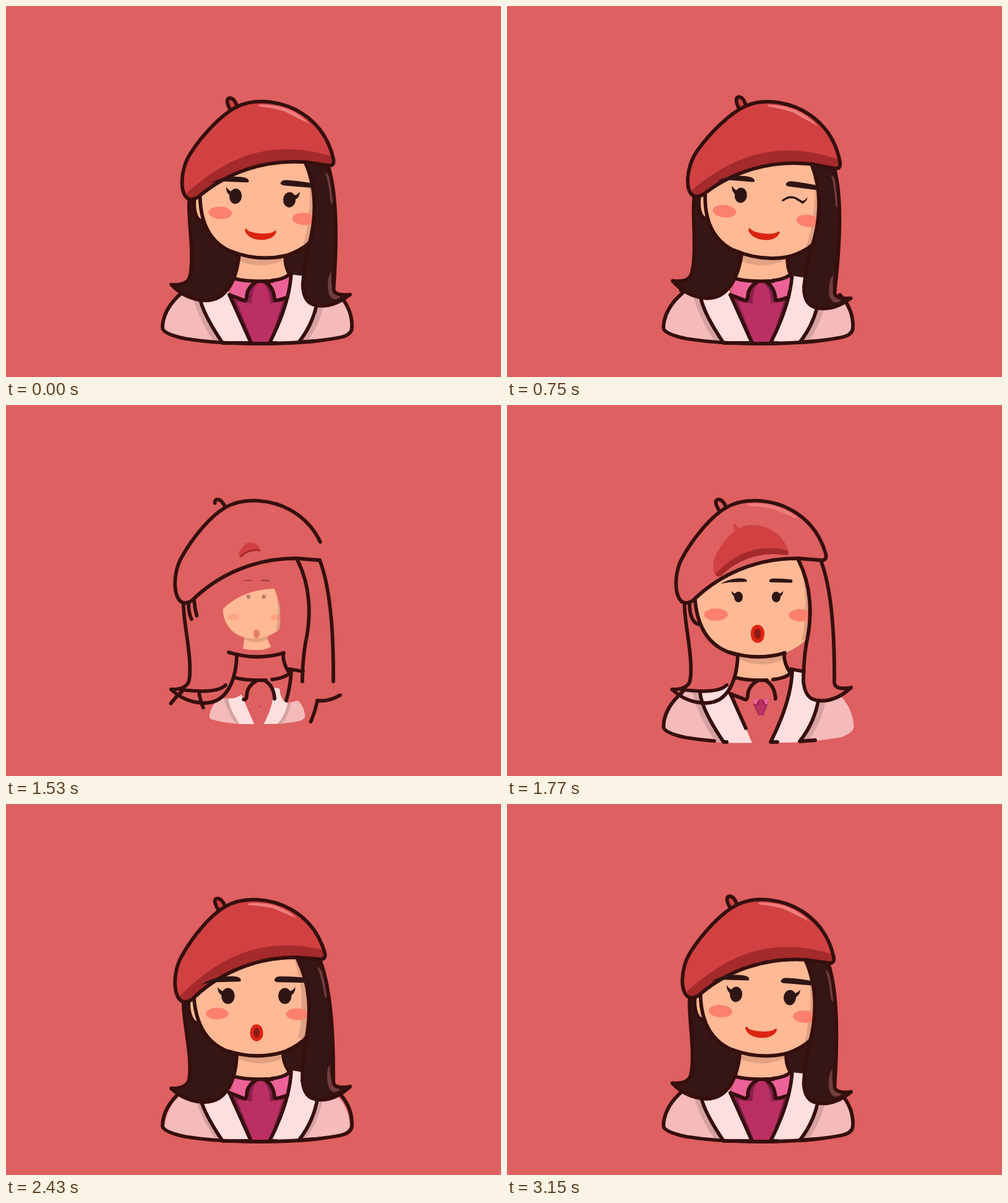
Animation of 800x600 px, one loop 3.18 s. Source, as an HTML page:

```html
<!DOCTYPE html>
<html lang="en">
<head>
<meta charset="utf-8">
<title>Girl in a beret</title>
<style>
html, body { margin: 0; height: 100%; overflow: hidden; background: #de6060; }
svg { display: block; width: 800px; height: 600px; }
.line path { fill: none; stroke: #350f0d; stroke-width: 5.8; stroke-linecap: round; stroke-linejoin: round; }
</style>
</head>
<body>
<svg viewBox="0 0 800 600">
  <defs>
    <path id="hatShape" d="M507 251Q495 250 470 248C400 248 345 275 306 311Q297 321 288 320C270 318 268 273 284 246C301 215 330 180 354 166C385 148 430 153 460 170C490 187 507 213 515 240Q518 252 507 251Z"/>
    <path id="faceShape" d="M304 314C342 275 400 248 470 248Q490 290 489 340Q488 365 486 377C468 396 440 408 405 408C345 408 308 372 304 314Z"/>
    <clipPath id="hatClip"><use href="#hatShape"/></clipPath>
    <clipPath id="faceClip"><use href="#faceShape"/></clipPath>
  </defs>

  <g id="body">
    <path fill="#f5baba" d="M252 520C256 494 268 475 290 462Q335 468 355 451L396 546Q320 548 262 532Q251 528 252 520ZM461 428L478 432Q480 470 504 478L538 470Q558 490 560 520Q560 530 540 537Q490 546 427 546Q458 490 461 428Z"/>
    <path fill="#d5a1a1" d="M299 463H312Q320 505 350 546L338 545Q312 510 299 463ZM504 478L515 477Q508 515 486 543L472 545Q497 515 504 478Z"/>
    <path fill="#ffdede" d="M312 463Q335 466 355 451L396 546H350Q320 505 312 463ZM461 428L478 432Q480 470 504 478Q497 515 472 545L427 546Q458 490 461 428Z"/>
  </g>
  <g id="neck">
    <path fill="#ffb995" d="M374 385H449V408Q450 420 460 434Q440 446 410 445Q385 445 369 440Q373 420 374 385Z"/>
    <path fill="#e2a183" d="M374 400H449V411Q412 428 374 411Z"/>
  </g>
  <g id="shirt">
    <path fill="#87204d" d="M361 467L370 442L412 446L459 437L455 471L427 546H396Z"/>
    <path fill="#bb2f62" d="M373 478L397 481Q397 450 411 447Q425 450 427 481L447 478L426 546H400Z"/>
    <path fill="#ec6298" d="M370 441L404 446Q387 453 386 477L361 467ZM420 446Q435 453 436 477L455 471L459 437Z"/>
  </g>
  <g class="line">
    <path data-t="1030 480" d="M355 453Q340 468 281 460"/>
    <path data-t="1415 690" d="M284 464C265 480 253 500 253 520Q252 530 290 538Q340 546 405 546Q490 546 540 536Q559 532 559 520Q560 490 538 467"/>
    <path data-t="1330 550" d="M312 463Q313 490 350 545H396"/>
    <path data-t="1560 260" d="M361 467L396 545"/>
    <path data-t="1300 430" d="M461 430Q459 480 426 545H437"/>
    <path data-t="1040 440" d="M458 427L480 431"/>
    <path data-t="1300 440" d="M503 479Q496 515 473 544L498 542"/>
    <path data-t="1040 440" d="M457 435Q448 442 430 444"/>
    <path data-t="1040 440" d="M370 441Q388 446 420 445"/>
    <path data-t="1780 200" d="M420 445H430"/>
    <path data-t="1200 450" d="M405 446Q389 455 389 471Q388 478 384 476L361 467"/>
    <path data-t="1040 450" d="M419 446Q433 455 434 475"/>
    <path data-t="1780 250" d="M434 475Q435 478 455 471"/>
  </g>

  <g id="head">
    <g id="hair">
      <path fill="#351614" d="M287 318Q290 360 296 400Q299 445 290 455Q280 461 266 459Q290 482 322 482C360 482 372 440 373 404L405 380L449 402V415L458 431L479 432C480 460 484 478 504 478Q530 480 556 457Q540 461 531 453Q532 310 507 250L470 248L300 310Z"/>
      <path fill="#713d3d" d="M503 263C513 262 522 305 518 313C514 315 513 282 503 263ZM524 423C518 425 516 463 530 466Q538 467 541 461C526 460 524 440 524 423Z"/>
      <path fill="#ffb995" d="M299 314Q289 345 312 356L320 320Z"/>
    </g>
    <g id="face">
      <use href="#faceShape" fill="#ffb995"/>
      <g clip-path="url(#faceClip)">
        <g id="blush">
          <path fill="#dfa083" d="M469 248Q484 290 481 330Q480 370 475 380H510V248Z"/>
          <g id="cheeks" fill="#fb816c"><ellipse cx="338" cy="339" rx="19" ry="10"/><ellipse cx="474" cy="340" rx="19" ry="10"/></g>
        </g>
      </g>
    </g>
    <g class="line">
      <path data-t="1200 450" d="M295 320Q295 342 303 351Q307 355 313 355"/>
      <path data-t="1400 350" d="M304 316C309 372 337 396 372 404"/>
      <path data-t="1030 450" d="M360 400Q405 414 449 401"/>
      <path data-t="1780 200" d="M449 401Q472 392 487 376"/>
      <path data-t="1030 480" d="M470 249C492 290 494 340 484 385Q479 415 479 447"/>
      <path data-t="1540 200" d="M479 447Q482 477 504 478"/>
      <path data-t="1100 560" d="M503 478Q530 481 556 457"/>
      <path data-t="1030 480" d="M507 251Q530 310 529 447"/>
      <path data-t="1540 200" d="M529 447Q528 462 556 457"/>
      <path data-t="1030 480" d="M287 321C285 345 302 410 296 445Q293 460 267 460"/>
      <path data-t="1030 490" d="M267 460Q290 482 322 482C360 481 372 440 373 404"/>
      <path data-t="1030 450" d="M448 401Q447 417 457 432"/>
    </g>
    <g id="hat">
      <path fill="#d14141" d="M354 165Q348 151 340 152Q334 155 343 171Z"/>
      <use href="#hatShape" fill="#d14141"/>
      <path clip-path="url(#hatClip)" fill="#a52a2b" d="M282 310C325 268 395 205 520 238V330H282Z"/>
    </g>
    <path id="shine" fill="#f07c7c" d="M389 160Q440 155 473 186Q447 175 430 168Q412 164 389 163Z"/>
    <g class="line">
      <path data-t="1200 430" d="M354 165Q348 151 340 153Q334 156 343 171"/>
      <path data-t="1030 520" d="M507 251Q495 250 470 248C400 248 345 275 306 311Q297 321 288 320C270 318 268 273 284 246C301 215 330 180 354 166C385 148 430 153 460 170C490 187 507 213 515 240Q518 252 507 251Z"/>
    </g>
    <g id="features" fill="#2e1514">
      <path id="brows" d="M320 292Q338 280 360 279Q379 278 381 284Q382 287 377 287L340 288Q330 289 320 292ZM485 282V289L440 288Q431 288 432 284Q434 279 442 279Q465 279 485 282Z"/>
      <g id="eyes">
        <g transform="translate(361.5 310.5)"><ellipse rx="10" ry="12.3"/><path d="M-6-7Q-12-8-16-14Q-16-4-8 0Z"/></g>
        <g transform="translate(448 310.5)">
          <g id="openEye"><ellipse rx="10" ry="12.3"/><path d="M6-7Q12-8 16-14Q16-4 8 0Z"/></g>
          <g id="closedEye"><path fill="none" stroke="#2e1514" stroke-width="3.4" stroke-linecap="round" d="M-18 1Q-9-8 2-5Q8-2 13 0"/><path d="M9 0Q17-1 21-9Q21-2 14 3Z"/></g>
        </g>
      </g>
      <g id="mouth">
        <path id="lips" fill="#db2512" stroke="#db2512" stroke-width="4" stroke-linejoin="round"/>
        <path id="gap" fill="#8a1a18"/>
      </g>
    </g>
  </g>
</svg>
<script>
const LOOP = 3180, RESTART = 1020;
const $ = id => document.getElementById(id);
const lines = [...document.querySelectorAll('[data-t]')].map(el => [el, ...el.dataset.t.split(' ').map(Number)]);

const ramp = (t, a, b) => Math.min(1, Math.max(0, (t - a) / (b - a)));
const smooth = (t, a, b) => (1 - Math.cos(Math.PI * ramp(t, a, b))) / 2;

// Accelerates to 1 at `end`, then rings with a 400 ms period.
function spring(t, end, amp, dur = 683, pow = 1.6) {
  if (t < end) return ramp(t, end - dur, end) ** pow;
  const s = (t - end) / 1000;
  return 1 + amp * Math.sin(5 * Math.PI * s) * Math.exp(-2.7 * s);
}

function scale(id, s, cx, cy) {
  $(id).setAttribute('transform', `translate(${cx} ${cy}) scale(${Math.max(s, 1e-4)}) translate(${-cx} ${-cy})`);
}

// Mouth shapes: half width, corner y, upper and lower control y, control width.
const LIPS = [[9, 0, -16.7, 16.7, 1], [16, -7, -7, 14.5, 1], [23.5, -6, 2, 10.5, .78]];
const GAP = [[5, 0, -11, 11, 1], [13, -3.5, -3.5, 9, 1], [0, 2, 2, 2, 1]];

function mouthPath(shapes, m) {
  const i = m < 1 ? 0 : 1, f = m - i;
  const [w, c, a, b, k] = shapes[i].map((v, n) => v + (shapes[i + 1][n] - v) * f);
  const x = w * k;
  return `M${-w} ${c}C${-x} ${a} ${x} ${a} ${w} ${c}C${x} ${b} ${-x} ${b} ${-w} ${c}Z`;
}

function draw(now) {
  let t = now % LOOP;
  if (t < RESTART) t += LOOP;

  for (const [el, start, dur] of lines) {
    const p = ramp(t, start, start + dur) ** 1.6;
    el.style.display = p > 0 ? '' : 'none';
    el.style.strokeDasharray = p < 1 ? `${p * el.getTotalLength()} 2000` : 'none';
  }

  const grow = spring(t, 1770, 0), soft = spring(t, 1770, .36), eyes = spring(t, 1905, .28);
  const fade = .35 + .65 * ramp(t, 1530, 1740);
  scale('body', spring(t, 1770, .203), 406, 486);
  scale('shirt', spring(t, 2050, .02, 680, 2.6), 410, 487);
  scale('neck', grow, 397, 347);
  scale('face', grow, 397, 347);
  scale('blush', grow ? soft / grow : 0, 406, 340);
  scale('hair', spring(t, 2060, .03, 580, 2), 411, 367);
  scale('hat', spring(t, 2010, .17), 394, 234);
  scale('shine', spring(t, 1770, .4, 683, 2.7), 429, 173);
  scale('brows', eyes, 404, 284);
  scale('eyes', eyes, 404, 310);
  for (const id of ['features', 'cheeks', 'shine']) $(id).setAttribute('opacity', fade);

  $('mouth').setAttribute('transform', `translate(405 370) scale(${Math.max(soft, 1e-4)})`);
  const m = ramp(t, 2690, 2850) + smooth(t, 2850, 3160);
  $('lips').setAttribute('d', mouthPath(LIPS, m));
  $('gap').setAttribute('d', mouthPath(GAP, m));

  const wink = smooth(t, 3510, 3680) - smooth(t, 4040, 4160);
  $('openEye').setAttribute('transform', `scale(1 ${1 - .8 * wink})`);
  $('openEye').style.display = wink < .75 ? '' : 'none';
  $('closedEye').style.display = wink < .75 ? 'none' : '';

  $('head').setAttribute('transform', `rotate(${6.2 * smooth(t, 2710, 3540)} 410 460)`);
}

function tick() {
  draw(performance.now());
  requestAnimationFrame(tick);
}
tick();
</script>
</body>
</html>
```
